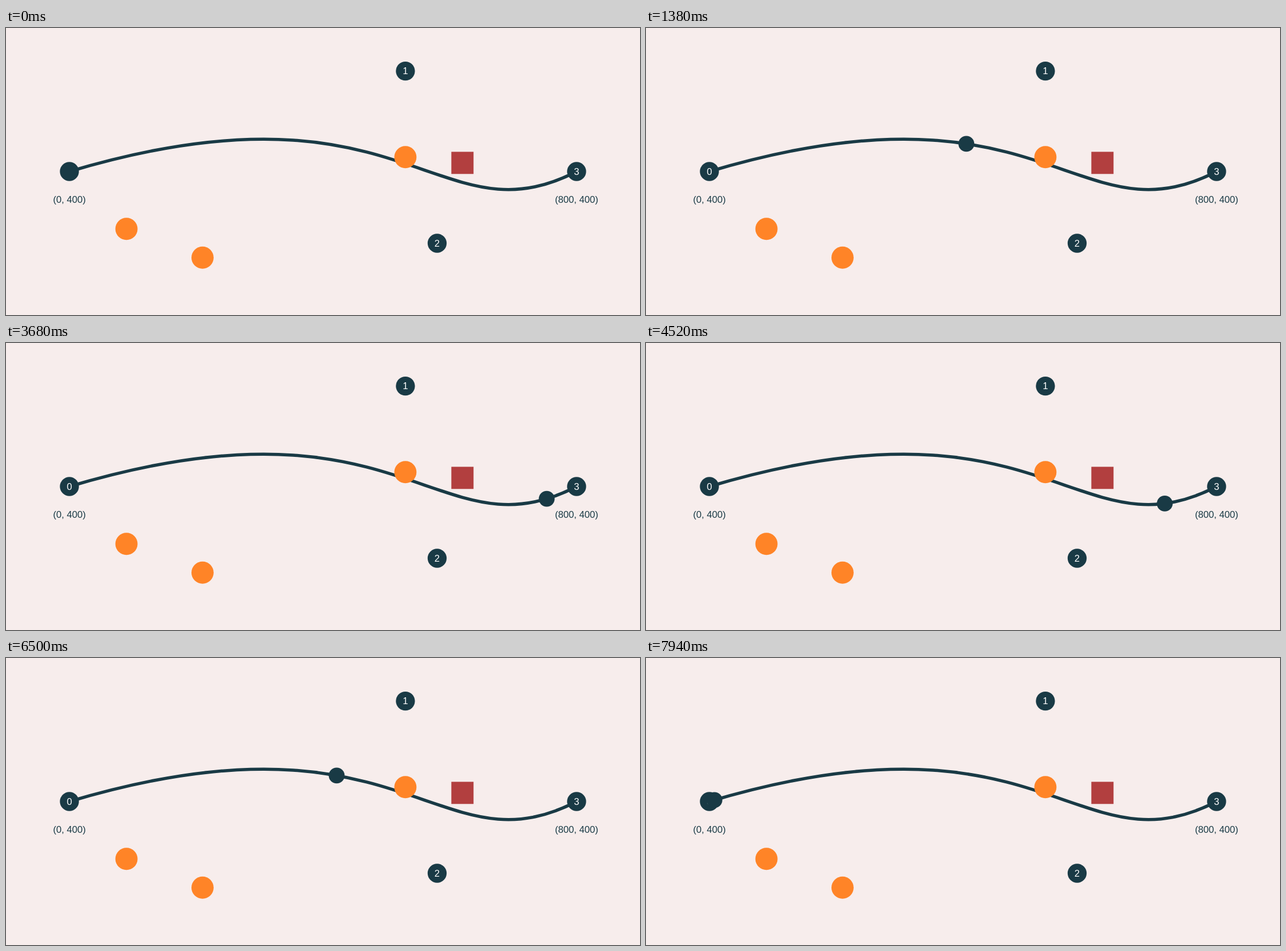
Write an HTML page that moves like this. It is 1111 px wide and 504 px high and loops after 7960 ms.

```html
<!DOCTYPE html>
<html lang="en">
<head>
<meta charset="utf-8">
<title>Point on a cubic curve</title>
<style>
  html, body { margin: 0; width: 100%; height: 100%; overflow: hidden; background: #f7edec; }
  svg { display: block; width: 1111px; height: 504px; }
  text { font: 16.67px "Liberation Sans", Arial, sans-serif; text-anchor: middle; }
</style>
</head>
<body>
<svg id="stage" viewBox="0 0 1111 504"></svg>
<script>
const DARK = '#193a45', ORANGE = '#ff8427', RED = '#b23f3f';
const LOOP = 7960, STEP = 20;
const points = [[111.1, 252], [699.9, 75.6], [755.5, 378], [999.9, 252]];
const stage = document.getElementById('stage');

function add(tag, attrs, content = '') {
  const el = document.createElementNS('http://www.w3.org/2000/svg', tag);
  for (const name in attrs) el.setAttribute(name, attrs[name]);
  el.textContent = content;
  return stage.appendChild(el);
}
const circle = (cx, cy, r, fill) => add('circle', { cx, cy, r, fill });
const label = (x, y, fill, content) => add('text', { x, y, fill }, content);

const [start, ...rest] = points;
add('path', { d: `M${start}C${rest.join(' ')}`, fill: 'none', stroke: DARK, 'stroke-width': 5.56 });

for (const [x, y] of [[211.1, 352.8], [344.4, 403.2], [699.9, 226.8]]) circle(x, y, 19.44, ORANGE);
add('rect', { x: 780.4, y: 217.4, width: 38.9, height: 38.9, fill: RED });

points.forEach(([x, y], i) => {
  circle(x, y, 16.67, DARK);
  label(x, y + 5.8, '#fff', i);
});
label(111.1, 307.3, DARK, '(0, 400)');
label(999.9, 307.3, DARK, '(800, 400)');

const dot = circle(...start, 13.89, DARK);

function bezier(t, axis) {
  const u = 1 - t;
  const [a, b, c, d] = points.map(p => p[axis]);
  return u * u * u * a + 3 * u * u * t * b + 3 * u * t * t * c + t * t * t * d;
}

// The dot runs along the curve and back at a constant rate of t.
let origin;
function draw(now) {
  origin ??= now;
  const time = Math.floor(((now - origin) % LOOP) / STEP + 0.01) * STEP;
  const t = 1 - Math.abs(1 - time / (LOOP / 2));
  dot.setAttribute('cx', bezier(t, 0));
  dot.setAttribute('cy', bezier(t, 1));
  requestAnimationFrame(draw);
}
requestAnimationFrame(draw);
</script>
</body>
</html>
```
